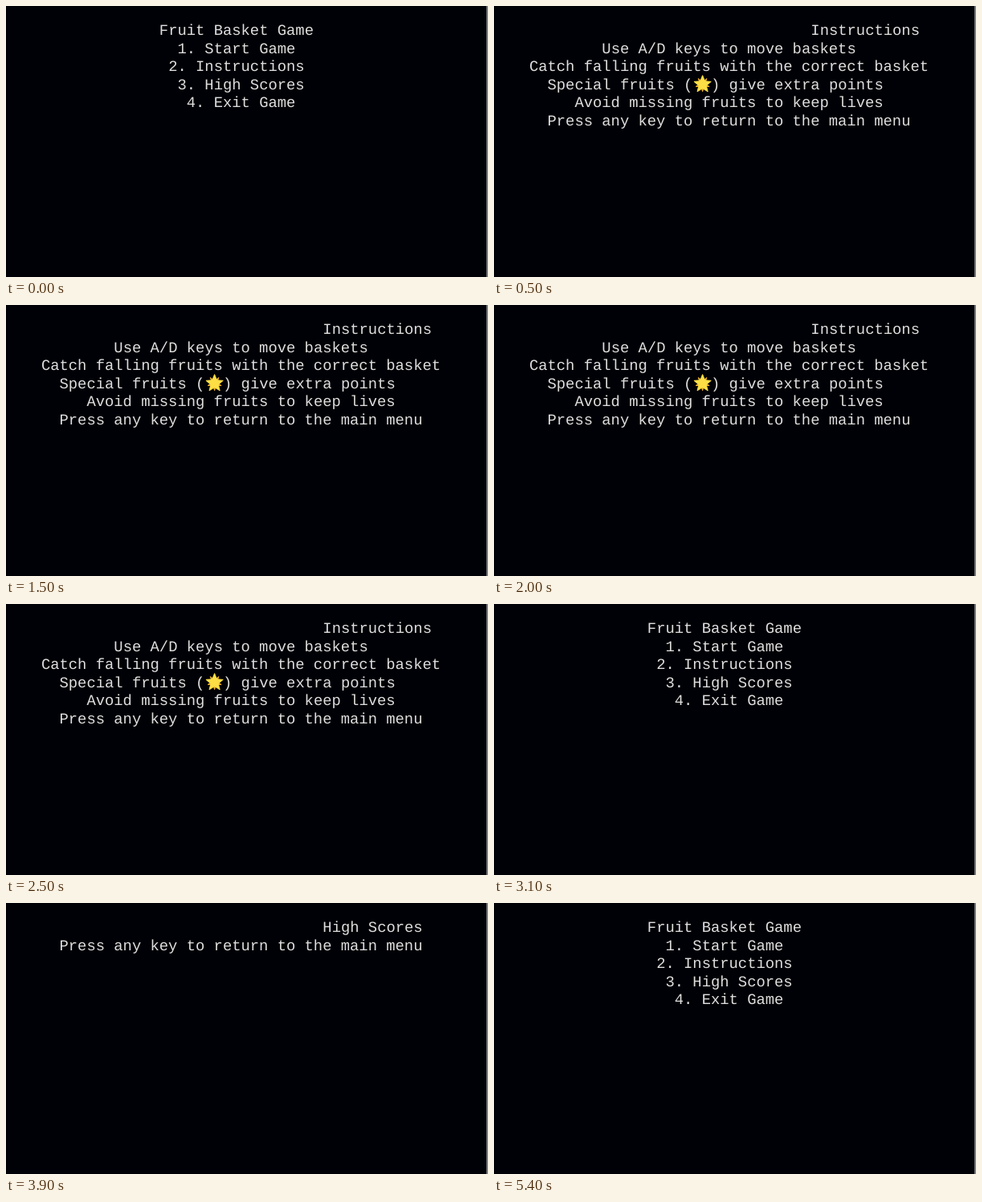
An HTML page that plays this animation: 600x338 px, repeating every 5500 ms.

```html
<!DOCTYPE html>
<html lang="en">
<head>
<meta charset="utf-8">
<title>Fruit Basket Game</title>
<style>
  html, body { margin: 0; width: 100%; height: 100%; overflow: hidden; background: #000106; }
  svg { display: block; width: 100vw; height: 100vh; }
  text {
    font: 18.84px "Liberation Mono", monospace;
    fill: #dedede;
    text-rendering: geometricPrecision;
  }
</style>
</head>
<body>
<svg id="stage" viewBox="0 0 600 338">
  <rect width="600" height="338" fill="#000106"/>
  <rect x="598" width="2" height="338" fill="#7c7c7e"/>
</svg>
<script>
const LOOP = 5500;
const LEFT = 43.9, CELL = 11.305, BASE = 36, LINE = 22.52;
const stage = document.getElementById("stage");

// Each line of text: [column, row, string]
const screens = {
  menu: [
    [13, 0, "Fruit Basket Game"],
    [15, 1, "1. Start Game"],
    [14, 2, "2. Instructions"],
    [15, 3, "3. High Scores"],
    [16, 4, "4. Exit Game"]
  ],
  help: [
    [31, 0, "Instructions"],
    [8, 1, "Use A/D keys to move baskets"],
    [0, 2, "Catch falling fruits with the correct basket"],
    [2, 3, "Special fruits ("],
    [20, 3, ") give extra points"],
    [5, 4, "Avoid missing fruits to keep lives"],
    [2, 5, "Press any key to return to the main menu"]
  ],
  scores: [
    [31, 0, "High Scores"],
    [2, 1, "Press any key to return to the main menu"]
  ]
};

const timeline = [
  [0, "menu"], [500, "help"], [3100, "menu"], [3800, "scores"], [5400, "menu"]
];

function add(parent, tag, attrs, content = "") {
  const el = document.createElementNS("http://www.w3.org/2000/svg", tag);
  for (const key in attrs) el.setAttribute(key, attrs[key]);
  el.textContent = content;
  return parent.appendChild(el);
}

function star(parent, outer, inner, turn, color) {
  const points = Array.from({ length: 10 }, (_, i) => {
    const r = i % 2 ? inner : outer;
    const a = turn + (i * Math.PI) / 5;
    return [259.6 + r * Math.sin(a), 97.8 - r * Math.cos(a)].map(n => n.toFixed(2));
  });
  add(parent, "polygon", {
    points: points.join(" "), fill: color,
    stroke: color, "stroke-width": 1, "stroke-linejoin": "round"
  });
}

for (const [name, lines] of Object.entries(screens)) {
  const group = add(stage, "g", {});
  for (const [col, row, string] of lines) {
    const x = LEFT + col * CELL, y = BASE + row * LINE;
    // The imperceptible tilt keeps baselines from snapping to whole pixels.
    add(group, "text", { transform: `translate(${x} ${y}) rotate(0.005)` }, string);
  }
  if (name === "help") {
    star(group, 9, 3.2, Math.PI, "#eeb02c");
    star(group, 11.2, 4.9, 0, "#fddf45");
  }
  const frames = timeline.map(([time, shown]) => ({
    offset: time / LOOP, opacity: shown === name ? 1 : 0, easing: "steps(1, end)"
  }));
  frames.push({ offset: 1, opacity: frames[0].opacity });
  group.animate(frames, { duration: LOOP, iterations: Infinity });
}
</script>
</body>
</html>
```
